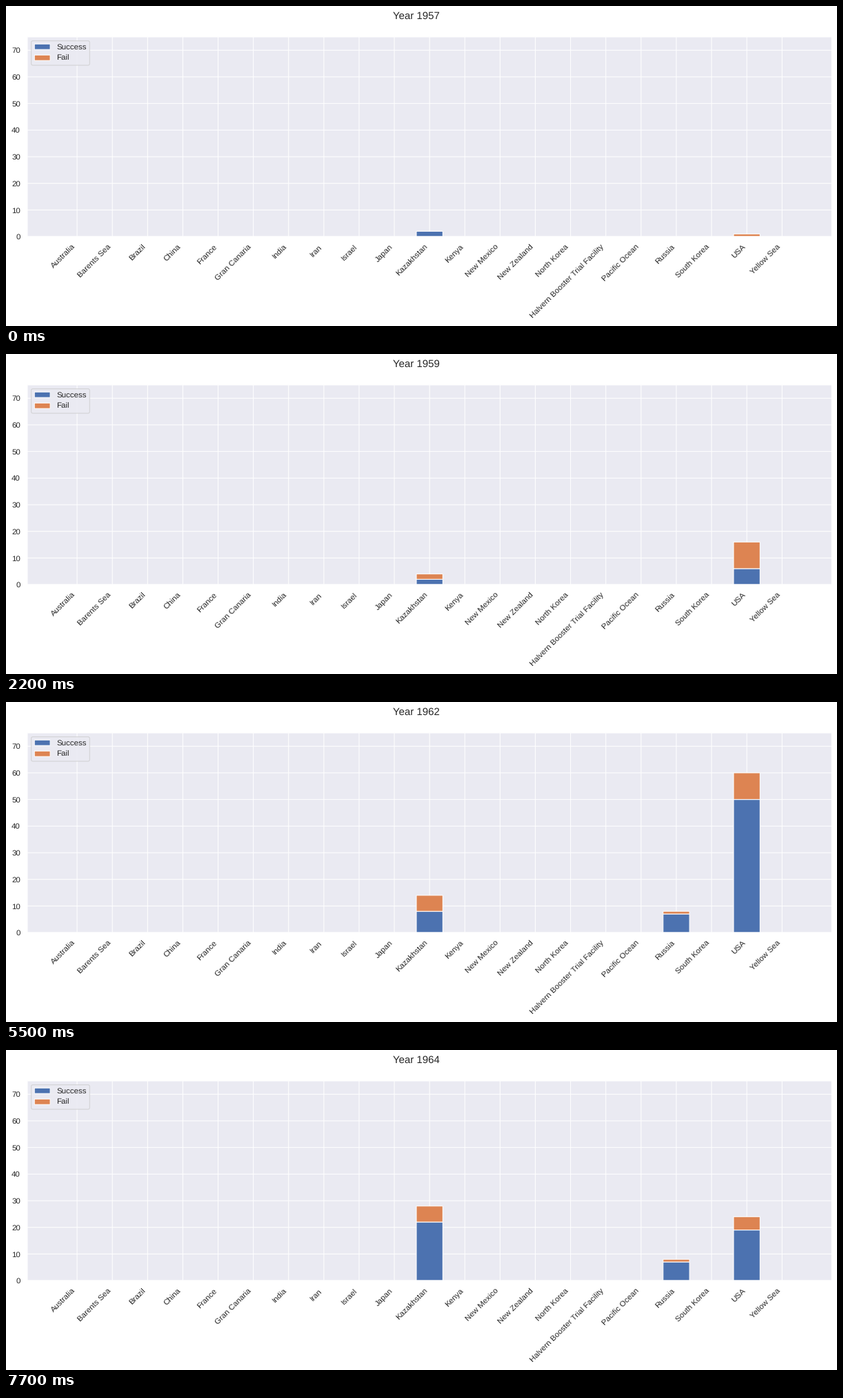
These frames come from a looping animation (1205 px wide and 465 px high, 8 s). A matplotlib script:

```python
import matplotlib.pyplot as plt
from matplotlib.animation import FuncAnimation

W, H, DPI = 1205, 465, 100
PX = 72 / DPI                      # one pixel in points
LEFT, RIGHT, TOP, BOTTOM = 30.9, 1197.5, 44.9, 335.1
BLUE, ORANGE, PANEL, INK = "#4C72B0", "#DD8452", "#EAEAF2", "#262626"
INTERVAL, FRAMES, STEPS_PER_YEAR = 100, 80, 11
FIRST_YEAR = 1957
BAR_WIDTH = 0.75
LABEL_SIZE, TITLE_SIZE = 11.45 * PX, 15.05 * PX

PLACES = [
    "Australia", "Barents Sea", "Brazil", "China", "France", "Gran Canaria",
    "India", "Iran", "Israel", "Japan", "Kazakhstan", "Kenya", "New Mexico",
    "New Zealand", "North Korea", "Halvern Booster Trial Facility",
    "Pacific Ocean", "Russia", "South Korea", "USA", "Yellow Sea",
]

# (success, fail) launches per year, starting at FIRST_YEAR
LAUNCHES = {
    "Kazakhstan": [(2, 0), (1, 4), (2, 2), (3, 6), (5, 2), (8, 6), (12, 4), (22, 6)],
    "Russia": [(0, 0), (0, 0), (0, 0), (0, 0), (0, 2), (7, 1), (4, 4), (7, 1)],
    "USA": [(0, 1), (5, 18), (6, 10), (16, 14), (27, 16), (50, 10), (13, 4), (19, 5)],
}

plt.rcParams.update({
    "font.family": "Liberation Sans",
    "text.color": INK,
    "text.hinting": "no_hinting",
})

fig = plt.figure(figsize=(W / DPI, H / DPI), dpi=DPI, facecolor="white")
ax = fig.add_axes([LEFT / W, 1 - BOTTOM / H, (RIGHT - LEFT) / W, (BOTTOM - TOP) / H],
                  facecolor=PANEL)
ax.patch.set_snap(False)
title = fig.text(595 / W, 1 - 18.6 / H, "", size=TITLE_SIZE, ha="center", va="baseline")


def make_bars(color, label):
    xs = [PLACES.index(name) for name in LAUNCHES]
    return ax.bar(xs, [0] * len(xs), BAR_WIDTH, color=color, label=label,
                  edgecolor="white", linewidth=1.05 * PX, snap=False)


def style_axes():
    count = len(PLACES)
    half = BAR_WIDTH / 2
    margin = 0.05 * (count - 1 + BAR_WIDTH)
    ax.set_xlim(-half - margin, count - 1 + half + margin)
    ax.set_ylim(0, 75)
    ax.set_yticks(range(0, 75, 10))
    ax.set_xticks(range(count), PLACES, rotation=45, ha="right")
    ax.tick_params(length=0, pad=9.9 * PX, labelsize=LABEL_SIZE, labelcolor=INK)
    ax.set_axisbelow(True)
    ax.grid(color="white", linewidth=1.05 * PX, snap=False)
    for spine in ax.spines.values():
        spine.set(color="white", linewidth=1.3 * PX, snap=False)


def add_legend():
    legend = ax.legend(loc="upper left", fontsize=LABEL_SIZE, facecolor=PANEL,
                       edgecolor="0.8", framealpha=0.8)
    legend.get_frame().set(linewidth=1.05 * PX, snap=False)
    for patch in legend.get_patches():
        patch.set_snap(False)


success = make_bars(BLUE, "Success")
fail = make_bars(ORANGE, "Fail")
style_axes()
add_legend()


def update(i):
    year = i // STEPS_PER_YEAR
    title.set_text(f"Year {FIRST_YEAR + year}")
    for low, high, counts in zip(success, fail, LAUNCHES.values()):
        good, bad = counts[year]
        low.set_height(good)
        high.set_y(good)
        high.set_height(bad)
        low.set_visible(good > 0)
        high.set_visible(bad > 0)
    return [title, *success, *fail]


anim = FuncAnimation(fig, update, frames=FRAMES, interval=INTERVAL,
                     init_func=lambda: update(0), repeat=True, repeat_delay=0)
plt.show()
```
